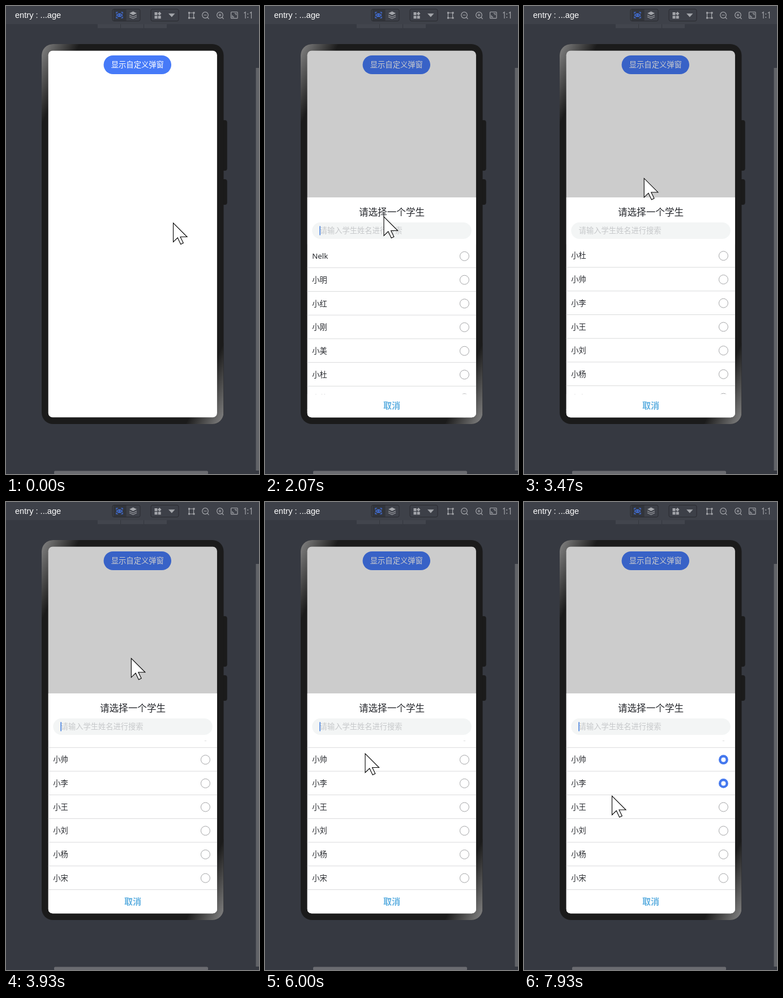
These frames come from a looping animation (447 by 824 pixels, 8 s). An HTML page:

```html
<!DOCTYPE html>
<html lang="zh-CN">
<head>
<meta charset="utf-8">
<title>选择学生</title>
<style>
  html, body { margin: 0; width: 100%; height: 100%; overflow: hidden; background: #363941; }
  svg { display: block; }
  text { font-family: "Noto Sans", "Noto Sans CJK SC", sans-serif; fill: #26282d; }
  .mid { text-anchor: middle; }
  .bar text { font-family: "Liberation Sans", sans-serif; fill: #fff; }
  .icon { fill: none; stroke: #a3a5aa; stroke-width: 1.2; }
  .solid { fill: #a3a5aa; }
  .box { fill: #3d4048; stroke: #2a2b30; }
</style>
</head>
<body>
<svg width="447" height="824" viewBox="0 0 447 824">
  <defs>
    <linearGradient id="shine" gradientUnits="userSpaceOnUse" x1="63" y1="67" x2="118" y2="93">
      <stop offset="0" stop-color="#868686"/>
      <stop offset="1" stop-color="#1b1b1b"/>
    </linearGradient>
    <clipPath id="body"><rect x="63" y="67" width="321.5" height="669" rx="20"/></clipPath>
    <clipPath id="screen"><rect x="74.7" y="78.7" width="298.2" height="645.5" rx="7.5"/></clipPath>
    <clipPath id="view"><rect x="74" y="419.9" width="300" height="306"/></clipPath>
    <path id="corner" d="M63 67h67L63 210z" fill="url(#shine)"/>
  </defs>

  <rect width="447" height="824" fill="#363941"/>
  <rect x="162" y="30" width="122" height="9" fill="#42454d"/>
  <path d="M202.5 32v7M243.5 32v7" stroke="#34363d"/>
  <g class="bar">
    <rect width="447" height="32" fill="#3e4149"/>
    <text x="16" y="21" font-size="14.6">entry : ...age</text>
    <rect class="box" x="188" y="5.5" width="49" height="21" rx="3"/>
    <path d="M190 6h22.5v20H190z" fill="#32353b"/>
    <g class="icon" style="stroke:#4577ee">
      <path d="M195 13.5V11h3M203 11h3v2.5M206 18.5V21h-3M198 21h-3v-2.5M195.5 16q5-5.5 10 0q-5 5.5-10 0z"/>
      <circle cx="200.5" cy="16" r="1.4"/>
    </g>
    <path class="solid" d="M224.5 9.5l6.5 3.3-6.5 3.3-6.5-3.3z"/>
    <path class="icon" d="M218 16l6.5 3.2 6.5-3.2M218 19l6.5 3.2 6.5-3.2"/>
    <rect class="box" x="256" y="5.5" width="49" height="21" rx="3"/>
    <path class="solid" d="M262.5 11h5v5h-5zM262.5 17.2h5v5h-5zM268.7 17.2h5v5h-5zM271.2 10l3.3 3.4-3.3 3.4-3.3-3.4zM287 13.3h11.5l-5.7 6.2z"/>
    <path class="icon" d="M323.5 12h8v9h-8z"/>
    <path class="solid" d="M322 10.5h3v3h-3zM330.5 10.5h3v3h-3zM322 19.5h3v3h-3zM330.5 19.5h3v3h-3z"/>
    <g class="icon">
      <g id="zoom"><circle cx="352" cy="16" r="5.3"/><path d="M349.5 16h5M356 20l2.5 2.8"/></g>
      <use href="#zoom" x="26"/><path d="M378 13.5v5"/>
      <rect x="397.6" y="10.5" width="11.5" height="11.2" rx="1"/>
      <path d="M403.5 13h3v3M403 19.3h-3v-3"/>
      <path d="M420.5 12.5l2.5-1.8V22M431 12.5l2.5-1.8V22"/>
    </g>
    <path class="solid" d="M426.5 13.2h1.6v1.7h-1.6zM426.5 19h1.6v1.7h-1.6z"/>
  </g>
  <rect x="441.5" y="109" width="6" height="709" fill="#616368"/>
  <rect x="85" y="818.5" width="272" height="6" rx="2" fill="#6a6b70"/>

  <g fill="#1b1b1b">
    <rect x="376" y="201" width="14.7" height="89" rx="4"/>
    <rect x="376" y="305" width="14.7" height="45" rx="4"/>
  </g>
  <g clip-path="url(#body)">
    <rect x="63" y="67" width="322" height="669" fill="#1b1b1b"/>
    <use href="#corner"/>
    <use href="#corner" transform="rotate(180 223.75 401.5)"/>
  </g>

  <g clip-path="url(#screen)">
    <rect x="74" y="78" width="300" height="648" fill="#fff"/>
    <rect x="172.5" y="87" width="119.5" height="33" rx="16.5" fill="#467af8"/>
    <text class="mid" x="232.3" y="108.2" font-size="13.3" font-weight="500" style="fill:#fff">显示自定义弹窗</text>
    <rect id="press" x="172.5" y="87" width="119.5" height="33" rx="16.5"/>
    <rect id="mask" x="74" y="78" width="300" height="648"/>
    <g id="sheet">
      <rect class="fade" x="74.7" y="337" width="298.2" height="388" fill="#fff"/>
      <g class="fade" clip-path="url(#view)"><g id="list"></g></g>
      <g class="fade">
        <rect x="74.7" y="337" width="298.2" height="82.4" fill="#fff"/>
        <text class="mid" x="224" y="368.6" font-size="16.6">请选择一个学生</text>
        <rect x="83.3" y="381" width="281.5" height="29" rx="14.5" fill="#f3f5f5"/>
        <rect id="hold" x="83.3" y="381" width="281.5" height="29" rx="14.5"/>
        <text x="96.7" y="400.3" font-size="13.25" style="fill:#c6c8ca">请输入学生姓名进行搜索</text>
        <rect id="caret" x="96.3" y="387.5" width="1.7" height="16" fill="#4d86e0"/>
      </g>
      <g class="fade">
        <rect x="74.7" y="683.3" width="298.2" height="42" fill="#fff"/>
        <text class="mid" x="224" y="708.8" font-size="15" font-weight="700" style="fill:#62b1e1">取消</text>
      </g>
    </g>
  </g>
  <path id="cursor" d="M0 0V33.5L7.7 26 13.2 37.5 17.8 35.3 12.5 24.5H24.5Z" fill="#fff" stroke="#000" stroke-width="1.1"/>
</svg>
<script>
const LOOP = 8000, TICK = 1000 / 15, ROW = 41.7, TOP = 419.4, MAX_SCROLL = 237;
const OPEN = 1338, SWIPE = 2900, TAPS = [5100, 6400], PICKS = { 小帅: 7400, 小李: 7860 };
const names = ['Nelk', ...[...'明红刚美杜帅李王刘杨宋'].map(c => '小' + c)];

// Pointer stops: [arrival time, x, y]; travel time follows from the distance
const stops = [
  [0, 295.5, 382], [530, 232.5, 103], [2000, 210, 371], [2600, 184, 555],
  [3066, 177.5, 446], [3500, 214, 296], [3930, 221.3, 275.3], [4130, 222, 228],
  [4930, 153.5, 395.5], [5600, 172, 619], [5930, 177, 443], [6200, 158, 393],
  [6930, 191.5, 426.5], [7130, 179, 455], [7700, 165, 498], [7930, 155.5, 517.5]
];
const MS_PER_PX = 1.6;

const $ = id => document.getElementById(id);
const set = (el, attrs) => Object.entries(attrs).forEach(([k, v]) => el.setAttribute(k, v));
const ramp = (t, from, ms) => Math.min(1, Math.max(0, (t - from) / ms));
const smooth = f => f * f * (3 - 2 * f);
const easeOut = f => 1 - (1 - f) ** 2;
const pulse = (t, from) => ramp(t, from, 90) - ramp(t, from + 160, 90);

$('list').innerHTML = names.map((name, i) => {
  const y = TOP + i * ROW, mid = y + 20.8;
  return `<text x="83.3" y="${mid + 4.9}" font-size="13.25">${name}</text>
    <circle class="radio" cx="352.4" cy="${mid + .3}" fill="#fff"/>
    <path d="M74 ${y + ROW - .3}h300" stroke="#dadbdc"/>`;
}).join('');
const radios = document.querySelectorAll('.radio');
const fades = document.querySelectorAll('.fade');

function pointer(t) {
  const next = stops.findIndex(s => s[0] > t);
  if (next < 0) return stops.at(-1).slice(1);
  const [t0, x0, y0] = stops[next - 1], [t1, x1, y1] = stops[next];
  const ms = Math.min(t1 - t0, MS_PER_PX * Math.hypot(x1 - x0, y1 - y0));
  const f = smooth(ramp(t, t1 - ms, ms));
  return [x0 + (x1 - x0) * f, y0 + (y1 - y0) * f];
}

// Each tap restarts the blink with the caret hidden
function caretOn(t) {
  const since = TAPS.findLast(tap => tap <= t) ?? 1430;
  return (t - since + LOOP) % 1000 >= 500;
}

function draw(now) {
  const t = Math.floor((now % LOOP + 5) / TICK) * TICK % LOOP;
  set($('cursor'), { transform: `translate(${pointer(t)})` });

  const p = smooth(ramp(t, OPEN, 300));
  set($('press'), { opacity: .1 * pulse(t, 1150) });
  set($('mask'), { opacity: .2 * p });
  set($('sheet'), { transform: `translate(224 530.5) scale(${.925 + .075 * p}) translate(-224 -530.5)` });
  fades.forEach(el => set(el, { opacity: p }));

  const scroll = MAX_SCROLL * easeOut(ramp(t, SWIPE, 862));
  set($('list'), { transform: `translate(0 ${-scroll})` });
  set($('hold'), { opacity: .065 * TAPS.reduce((sum, tap) => sum + pulse(t, tap), 0) });
  set($('caret'), { opacity: +caretOn(t) });
  radios.forEach((radio, i) => set(radio, t >= PICKS[names[i]]
    ? { r: 6.2, stroke: '#4478ee', 'stroke-width': 4.4 }
    : { r: 8, stroke: '#a4a5a7', 'stroke-width': 1 }));
}

const start = performance.now();
function loop() {
  draw(performance.now() - start);
  requestAnimationFrame(loop);
}
loop();
</script>
</body>
</html>
```
